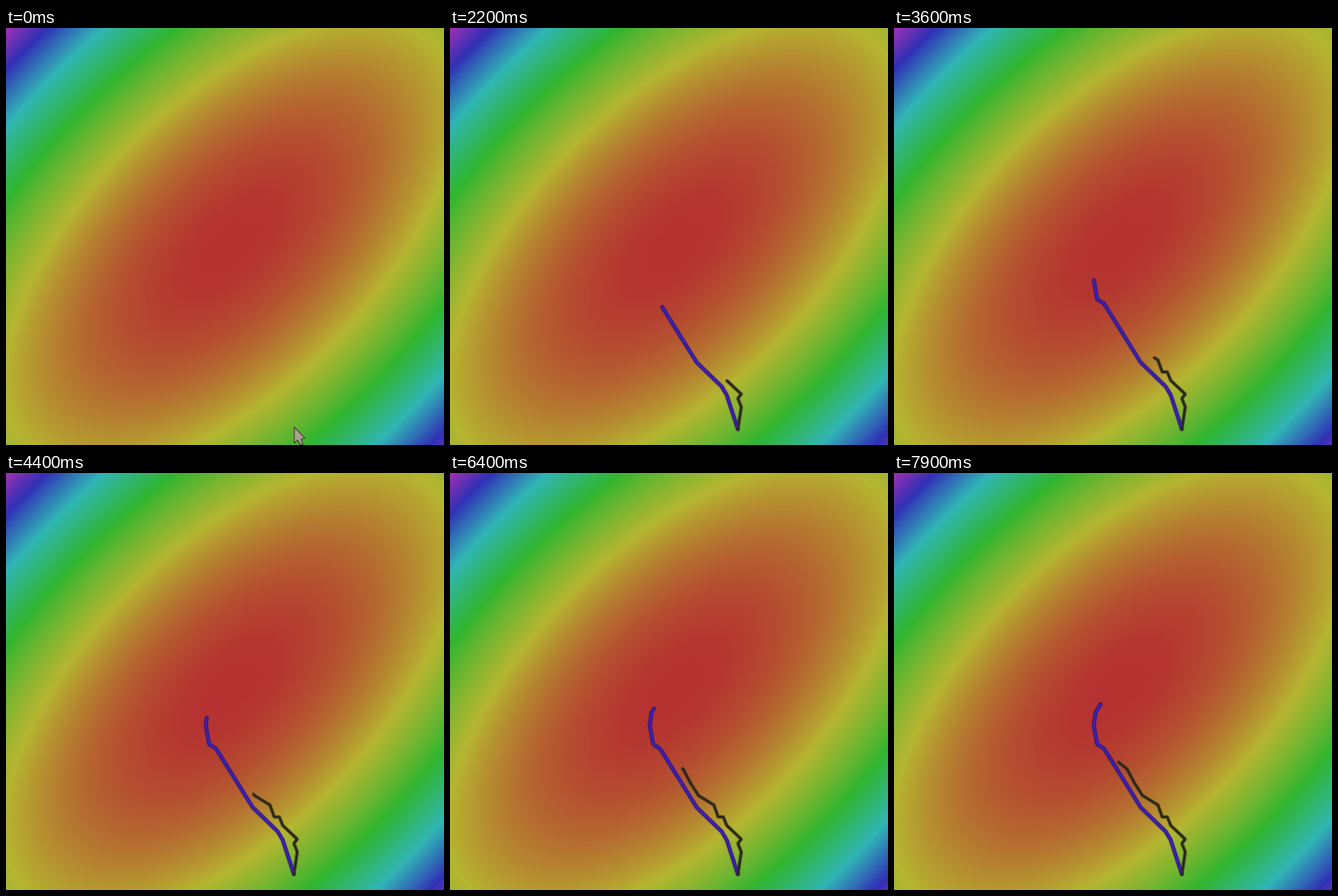
Write a matplotlib script that moves like this. It is 512 by 488 pixels and loops after 8000 ms.

```python
import numpy as np
import matplotlib.pyplot as plt
from matplotlib.animation import FuncAnimation
from matplotlib.colors import hsv_to_rgb
from matplotlib.patches import Polygon

W, H, DPI = 512, 488, 100
STEP, FRAMES = 100, 80
PX = 72 / DPI
CENTER = 262, 254

# Corners of the two descent paths, from the shared start
BLUE = [(336, 469), (323, 429), (317, 419), (288, 391), (245, 322),
        (237, 317), (233, 295), (235, 280), (241, 270)]
BLACK = [(336, 469), (340, 443), (336, 433), (340, 428), (323, 412),
         (319, 402), (313, 402), (308, 388), (290, 377), (281, 363),
         (272, 346), (262, 338)]
CURSOR = [(337, 467), (337, 486), (341, 482), (344, 488),
          (347, 487), (345, 481), (349.5, 480)]


def hue_field():
    """Hue grows with the squared distance in a tilted ellipse."""
    y, x = np.mgrid[0:H, 0:W] + 0.5
    dx, dy = x - CENTER[0], y - CENTER[1]
    short, long = (dx + dy) ** 2 / 2, (dx - dy) ** 2 / 2
    hue = 6.1e-6 * short + 1.5e-6 * long
    hsv = np.stack([hue, np.full_like(hue, 0.73), np.full_like(hue, 0.71)], -1)
    return hsv_to_rgb(hsv)


def fast_start(u):
    """Quick first rush, then a slow steady creep."""
    return 0.88 * np.tanh(4 * u) + 0.12 * u


def ease_out(u):
    return 1 - (1 - u) ** 1.6


def trail(points, share):
    """First part of a polyline, cut at a share of its length."""
    pts = np.array(points, float) + 0.5
    dist = np.append(0, np.cumsum(np.hypot(*np.diff(pts, axis=0).T)))
    s = np.linspace(0, share * dist[-1], 150)
    return np.interp(s, dist, pts[:, 0]), np.interp(s, dist, pts[:, 1])


fig = plt.figure(figsize=(W / DPI, H / DPI), dpi=DPI)
ax = fig.add_axes([0, 0, 1, 1])
ax.axis("off")
ax.imshow(hue_field(), extent=(0, W, H, 0), interpolation="nearest",
          aspect="auto")
ax.set_xlim(0, W)
ax.set_ylim(H, 0)


def stroke(color, width, alpha=1):
    return ax.plot([], [], color=color, lw=width * PX, alpha=alpha,
                   solid_capstyle="round", solid_joinstyle="round")[0]


# Soft dark rim under each core
blue_lines = [stroke("#3a2070", 5.6, 0.45), stroke("#2b1880", 4),
              stroke("#4020c0", 2)]
black_lines = [stroke("#3a3420", 4.6, 0.4), stroke("#2b2a1c", 3)]
cursor = ax.add_patch(Polygon(CURSOR, fc="#a8a192", ec="#4a4232", lw=1.1 * PX))


def draw(i):
    u = max(i - 1, 0) / (FRAMES - 2)
    cursor.set_visible(i == 0)
    for lines, points, ease in ((blue_lines, BLUE, fast_start),
                                (black_lines, BLACK, ease_out)):
        xs, ys = trail(points, ease(u))
        for line in lines:
            line.set_data(xs, ys)
            line.set_visible(i > 0)
    return [*blue_lines, *black_lines, cursor]


anim = FuncAnimation(fig, draw, frames=FRAMES, interval=STEP, repeat=True,
                     repeat_delay=0, blit=False)
plt.show()
```
